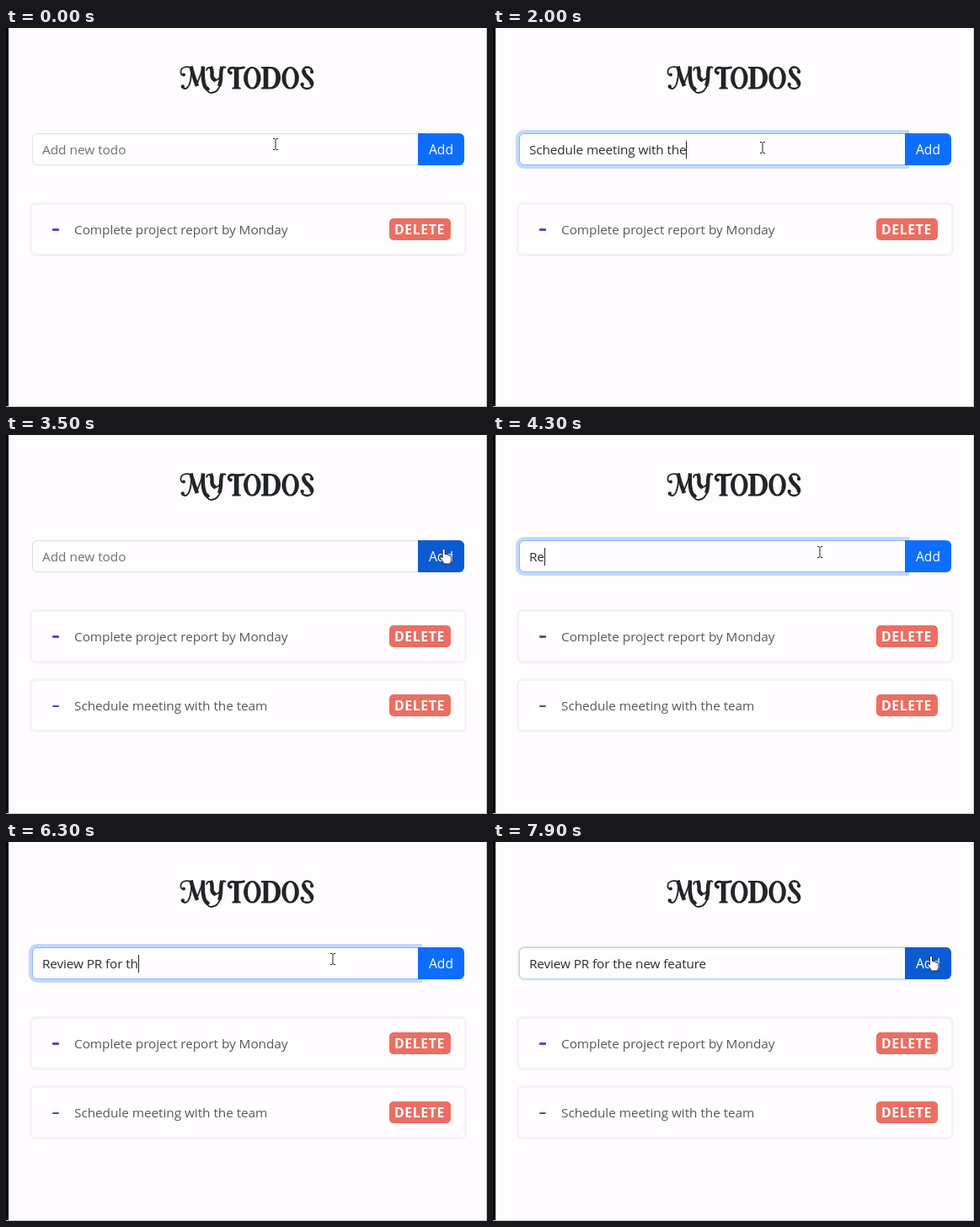
An HTML page that plays this animation: 571 by 450 pixels, repeating every 8000 ms.

```html
<!DOCTYPE html>
<html lang="en">
<head>
<meta charset="utf-8">
<title>My Todos</title>
<style>
  html, body { margin: 0; width: 100%; height: 100%; overflow: hidden; }
  body { background: #fefcfe; }
  #stage {
    position: relative; width: 571px; height: 450px; overflow: hidden;
    box-sizing: border-box;
    border: solid #c2cbbd; border-width: 0 1px 1px 0;
    font: 15.35px "Open Sans", "Noto Sans", sans-serif;
  }
  #stage * { box-sizing: border-box; }
  #stage > *, .card > * { position: absolute; white-space: pre; }
  .edge { left: 0; top: 0; width: 3px; height: 450px; background: #000; }
  h1 { margin: 0; left: 0; top: 0; }
  svg { position: absolute; left: 0; top: 0; overflow: visible; }

  .field {
    left: 31px; top: 125px; width: 459px; height: 38px; padding-left: 11px;
    line-height: 37px; color: #2b2f33; background: #fffdff;
    border: 1px solid #dee2e6; border-radius: 6px 0 0 6px;
    animation: focus 8s infinite;
  }
  #hint { position: absolute; left: 11px; color: #6c7278; }
  #text { letter-spacing: -.13px; }
  #caret {
    display: inline-block; width: 1px; height: 21px; margin-right: -1px;
    vertical-align: -5px; background: #212529;
  }
  .add {
    left: 489px; top: 125px; width: 55px; height: 38px;
    line-height: 38px; text-align: center; font-size: 15.6px; color: #fff;
    background: #0d6efd; border-radius: 0 6px 6px 0;
    animation: hover 8s infinite linear;
  }

  .card {
    left: 28px; top: 207px; width: 519px; height: 64px;
    border: 3px solid #f4f2f5; border-radius: 7px; background: #fffdff;
  }
  .card.new { top: 289px; animation: appear 8s infinite step-end; }
  .card i { left: 24px; top: 28px; width: 8px; height: 3px; border-radius: 1px; background: #5644d2; }
  .card.new i { top: 29px; height: 2px; }
  .card span { left: 50px; top: 0; line-height: 59px; letter-spacing: -.04px; color: #555a5f; }
  .card b {
    left: 424px; top: 16px; width: 73px; height: 26px; padding-left: 6px;
    line-height: 26px; font-size: 15.8px; letter-spacing: .6px;
    color: #fff; background: #ea6f62; border-radius: 5px;
  }

  #mouse { animation: move 8s infinite linear; }
  .hand { animation: hand 8s infinite step-end; }
  .beam { animation: beam 8s infinite step-end; }

  @keyframes focus {
    0%, 6.25%, 44.4%, 49.4%, 100% { border-color: #dee2e6; box-shadow: 0 0 0 0 #0d6efd00; z-index: 0; }
    8.1%, 42.5%, 51.2%, 98.2% { border-color: #86b7fe; box-shadow: 0 0 0 4px #0d6efd40; z-index: 0; }
  }
  @keyframes hover {
    0%, 39.7%, 46.7%, 96.6%, 100% { background: #0d6efd; }
    41.5%, 44.8%, 98%, 99.99% { background: #0c5bd3; }
  }
  @keyframes appear { 0% { visibility: hidden; } 43.1%, 100% { visibility: visible; } }
  @keyframes hand {
    0%, 44.8% { visibility: hidden; }
    39.7%, 96.6%, 100% { visibility: visible; }
  }
  @keyframes beam {
    0%, 44.8% { visibility: visible; }
    39.7%, 96.6%, 100% { visibility: hidden; }
  }
  @keyframes move {
    0%, 2.5% { transform: translate(320px, 138px); }
    5%, 35% { transform: translate(320px, 142px); }
    36.25% { transform: translate(371px, 150px); }
    40.6%, 43.75% { transform: translate(520px, 135px); }
    48.1%, 93.75% { transform: translate(388px, 139px); }
    97.5%, 100% { transform: translate(520px, 135px); }
  }
  .add, #mouse { z-index: 1; }
</style>
</head>
<body>
<div id="stage">
  <div class="edge"></div>

  <h1 aria-label="MY TODOS">
    <svg width="571" height="90" fill="#212529" fill-rule="evenodd">
      <defs>
        <path id="o" d="M-10.2 0a10.2 13.2 0 1 1 20.4 0a10.2 13.2 0 1 1-20.4 0zM-5.3 0a5.3 11.3 0 1 0 10.6 0a5.3 11.3 0 1 0-10.6 0z"/>
      </defs>
      <g fill="none" stroke="#212529" stroke-width="1.8" stroke-linecap="round">
        <!-- M -->
        <path d="M211.5 56C206 57 206 48 212 46.5S219 48 220.5 47M220.5 48C220 58 219 71 213 72Q210 72 209.5 69.5M226.5 67L234 47"/>
        <path stroke-width="4.6" stroke-linecap="butt" d="M219.5 45.5Q222 56 227 69M234 45.5Q233 58 235 66T241 71"/>
        <!-- Y -->
        <path d="M238 50Q239 46 243 47M246 60Q250 65 255 57M255 65Q252 77 244 77Q240 77 238.5 73M255 48Q258 45 260.5 47"/>
        <path stroke-width="4.4" stroke-linecap="butt" d="M243 46Q245 50 244.5 55T249 62.5M256.5 46C253.5 54 257 60 253 69"/>
        <!-- T -->
        <path stroke-width="2.8" d="M266.5 54C262.5 52 264 47 269 47.2Q275 48.5 282.5 46.8"/>
        <!-- S -->
        <path stroke-width="2.4" d="M363.5 52C363 45 352.5 44.5 352.5 51.5C352.5 58 364 59 364 66C364 74 351.5 73.5 351 67"/>
        <path stroke-width="4.8" d="M353.5 51.5C354 58 362.5 60 363 66"/>
      </g>
      <path d="M270.8 48h5.6v22l2.4 1v1.5h-10.4V71l2.4-1z"/>
      <path d="M303 46h11c8 0 12 6 12 13s-4 13.5-12.5 13.5H303v-1.8l2.7-.8V48.5L303 47.8zM311.3 48.2v22.1h2c5 0 7-5 7-11.2s-2-10.9-7-10.9z"/>
      <use href="#o" x="292.3" y="59.3"/>
      <use href="#o" x="337.6" y="59.3"/>
      <circle cx="211" cy="55.5" r="2"/>
      <circle cx="209.8" cy="69.5" r="2.2"/>
      <circle cx="239" cy="73.5" r="1.8"/>
      <circle cx="266.7" cy="53.2" r="2"/>
      <circle cx="363" cy="52" r="2.2"/>
      <circle cx="351.7" cy="67" r="2.2"/>
    </svg>
  </h1>

  <div class="field"><span id="hint">Add new todo</span><span id="text"></span><span id="caret"></span></div>
  <div class="add">Add</div>

  <div class="card"><i></i><span>Complete project report by Monday</span><b>DELETE</b></div>
  <div class="card new"><i></i><span>Schedule meeting with the team</span><b>DELETE</b></div>

  <svg id="mouse" width="1" height="1" fill="none" stroke="#222">
    <path class="beam" d="M-3 -6.5H-1L0 -5.5L1 -6.5H3M0 -5.5V5.5M-3 6.5H-1L0 5.5L1 6.5H3"/>
    <path class="hand" fill="#fff" stroke-linejoin="round" d="M-1.5 11V1.5Q-1.5 0 0 0T1.5 1.5V6.5Q4 5.5 4.2 7.3Q6.5 6.3 6.8 8.2Q9 7.6 9 9.6V13Q9 15.5 7.5 18H.5Q-1 15-4 11.5Q-5 9.5-3.5 9.2Q-2.5 9.2-1.5 11z"/>
  </svg>
</div>

<script>
  const LOOP = 8000;
  const focused = [[500, 3400], [3950, 7855]];

  // Start time, ms per key, keys; "\b" deletes, "\n" submits
  const bursts = [
    [650, 62, "Schedule "],
    [1260, 48, "meeting with the team."],
    [3000, 1, "\b"],
    [3450, 1, "\n"],
    [4140, 100, "Review PR"],
    [5650, 100, " for the new "],
    [7070, 50, "feature"]
  ];

  const [hint, text, caret] = ["hint", "text", "caret"].map(id => document.getElementById(id));

  function typedAt(t) {
    let value = "", lastKey = 0;
    for (const [start, step, keys] of bursts) {
      if (t < start) break;
      const count = Math.min(keys.length, Math.floor((t - start) / step) + 1);
      lastKey = start + (count - 1) * step;
      if (keys === "\b") value = value.slice(0, -1);
      else if (keys === "\n") value = "";
      else value += keys.slice(0, count);
    }
    return { value, lastKey };
  }

  let begin;
  function draw(now) {
    begin ??= now;
    const t = (now - begin) % LOOP;
    const { value, lastKey } = typedAt(t);
    const span = focused.find(([from, to]) => t >= from && t < to);
    const lit = span && (t - Math.max(lastKey, span[0])) % 1000 < 500;

    text.textContent = value;
    hint.style.visibility = value ? "hidden" : "visible";
    caret.style.visibility = lit ? "visible" : "hidden";
    requestAnimationFrame(draw);
  }
  requestAnimationFrame(draw);
</script>
</body>
</html>
```
